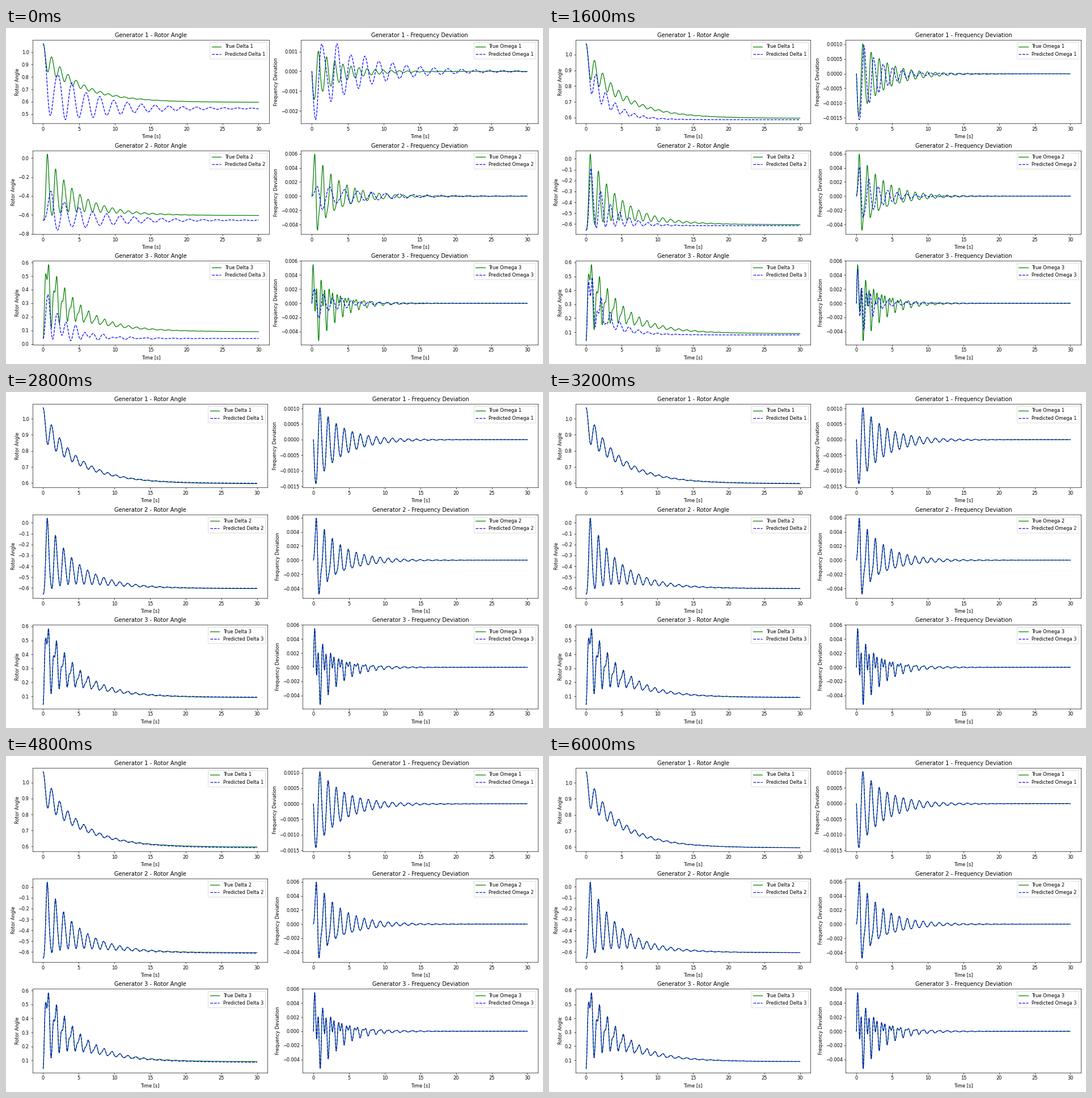
A matplotlib script that plays this animation: 947x592 px, repeating every 8000 ms.

```python
import numpy as np
import matplotlib.pyplot as plt
from matplotlib.animation import FuncAnimation

STEP = 200        # ms per update
UPDATES = 31      # learning steps, then the last one is held
FRAMES = 40
DPI = 59.2
WIDTH, HEIGHT = 16 * DPI, 10 * DPI
W0 = 377.0        # synchronous speed, rad/s
DT = 0.01
T = np.arange(0, 30 + DT / 2, DT)

# Three machines joined by lossless lines, machine 1 pushed off balance by 30 degrees
REST = np.array([0.545, -0.657, 0.040])
START = REST + [np.pi / 6, 0, 0]
K12, K13, K23 = 1.235, 0.867, 1.177


def learn():
    """Inertia and damping guesses, shape (machine, update)."""
    i = np.arange(UPDATES)
    x = np.clip(i / 12, 0, 1)
    # Drift share: how much of the damping machine 1 is believed to have
    share = np.interp(i, [0, 4, 11, 16, 20, 24, 30],
                      [0.001, 0.044, 0.105, 0.100, 0.080, 0.086, 0.0955])
    late = np.where(i < 11, 0, share - 0.0955)
    fade = (1 - x ** 3) ** 2

    m1 = np.full(UPDATES, 0.150)
    m2 = 0.0290 * 5.8 ** ((1 - x) ** 1.2)
    m3 = 0.0157 * 5.4 ** ((1 - x) ** 2.5)
    d2 = 0.0165 * 6.5 ** fade * (1 + 5 * late)
    d3 = 0.0185 * 3.2 ** fade
    d1 = share / (1 - share) * (d2 + d3)
    return np.array([m1, m2, m3]), np.array([d1, d2, d3])


def flow(angle):
    a, b, c = angle
    p12, p13, p23 = K12 * np.sin(a - b), K13 * np.sin(a - c), K23 * np.sin(b - c)
    return np.array([p12 + p13, p23 - p12, -p13 - p23])


def simulate(m, d):
    """Swing equations for all updates at once, fourth-order Runge-Kutta."""
    power = flow(REST)[:, None]

    def rate(s):
        return np.array([s[1], (power - flow(s[0]) - d * s[1]) / m])

    s = np.zeros((2,) + m.shape)
    s[0] = START[:, None]
    out = [s]
    for _ in T[1:]:
        a = rate(s)
        b = rate(s + DT / 2 * a)
        c = rate(s + DT / 2 * b)
        e = rate(s + DT * c)
        s = s + DT / 6 * (a + 2 * b + 2 * c + e)
        out.append(s)
    out = np.array(out)
    return out[:, 0], out[:, 1] / W0


curves = simulate(*learn())   # angle and speed: time, machine, update

fig, axes = plt.subplots(3, 2, figsize=(16, 10), dpi=DPI)
panels = []
for col, (kind, symbol) in enumerate([("Rotor Angle", "Delta"),
                                      ("Frequency Deviation", "Omega")]):
    for row in range(3):
        ax, data, n = axes[row, col], curves[col][:, row], row + 1
        ax.plot(T, data[:, -1], "g-", label=f"True {symbol} {n}")
        line, = ax.plot(T, data[:, 0], "b--", label=f"Predicted {symbol} {n}")
        ax.set_title(f"Generator {n} - {kind}")
        ax.set_xlabel("Time [s]")
        ax.set_ylabel(kind)
        ax.legend(loc="upper right")
        panels.append((ax, line, data))


def arrange():
    """Longer tick labels in the right column need a wider gutter."""
    ticks = axes[0, 1].get_yticks()
    gap = 62 if ticks[1] - ticks[0] < 0.0009 else 56
    left, right, top, bottom = 46.5, 938.3, 21, 557.6
    width = (right - left - gap) / 2
    fig.subplots_adjust(left=left / WIDTH, right=right / WIDTH,
                        top=1 - top / HEIGHT, bottom=1 - bottom / HEIGHT,
                        wspace=gap / width, hspace=0.3215)


def update(i):
    step = min(i, UPDATES - 1)
    for ax, line, data in panels:
        line.set_ydata(data[:, step])
        ax.relim()
        ax.autoscale_view()
    arrange()
    return [p[1] for p in panels]


anim = FuncAnimation(fig, update, frames=FRAMES, interval=STEP,
                     init_func=lambda: update(0), repeat=True, repeat_delay=0)
plt.show()
```
